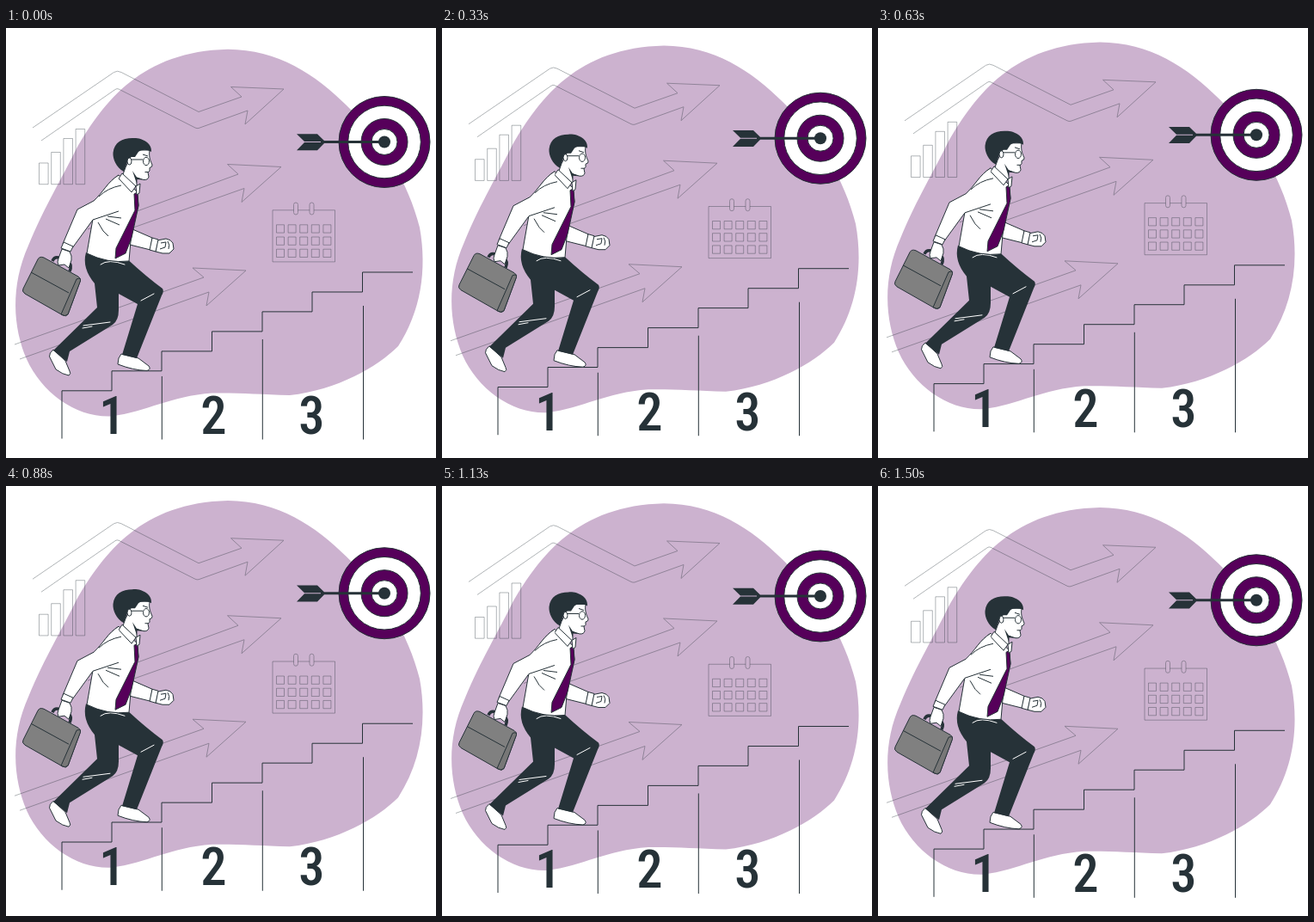
Animation, 500 px wide and 500 px high, one loop 1.54 s. Source, as an HTML page:

```html
<!DOCTYPE html>
<html lang="en">
<head>
<meta charset="utf-8">
<title>Steps to the goal</title>
<style>
  html, body { margin: 0; width: 100%; height: 100%; overflow: hidden; background: #fff; }
  svg { display: block; width: 100%; height: 100%; }
  .ink { fill: #263238; }
  .line { fill: none; stroke: #263238; stroke-width: 1; }
  .faint { fill: none; stroke: #263238; stroke-width: .9; opacity: .4; }
  .paper { fill: #fff; stroke: #263238; stroke-width: 1; stroke-linejoin: round; }
  .purple { fill: #56005a; stroke: #263238; stroke-width: 1; }
  .crease { fill: none; stroke: #fff; stroke-width: 1; stroke-linecap: round; }
  text { font: 500 60.5px "Roboto Condensed", Roboto, sans-serif; font-stretch: condensed; text-anchor: middle; }
</style>
</head>
<body>
<svg viewBox="0 0 500 500">
  <g id="scene">
    <path fill="#ccb2cf" d="M258 24.7C316 25 360 54 396 90C438 131 468 180 481 232C490 282 482 330 456 370C432 394 385 421 330 427C295 426 270 424 240 424.5C190 428 165 446 122 451.5C82 453 42 425 24 385C8 348 5 300 26 253C46 205 65 175 82 140C114 85 158 27 258 24.7Z"/>

    <g id="arrows" class="faint">
      <path d="M31 116L125.5 51.5Q129.5 49 134 51.5L224 97.5L274 80L261.5 68.5L323 71L278 112L281 96L224 116.5Q222 117 220 116L131 71Q129 70 127 71.5L41 131"/>
      <path d="M95 234L270 170L257.5 158.5L320 161.5L274 202.500L277 186.500L100 249"/>
      <path d="M10 368L230 290L217 279L279 282L233 323L236 307L16 385"/>
    </g>
    <path id="bars" class="faint"/>
    <path id="calendar" class="faint" d="M334.5 211.8H310V271.900H382.5V211.800H358M339.5 211.800H353"/>
    <g class="faint">
      <rect x="334.5" y="203" width="5" height="14" rx="2.5"/>
      <rect x="353" y="203" width="5" height="14" rx="2.5"/>
    </g>

    <g id="target">
      <circle class="purple" cx="440" cy="132.5" r="53"/>
      <circle class="paper" cx="440" cy="132.5" r="42.3"/>
      <circle class="purple" cx="440" cy="132.5" r="27"/>
      <circle class="paper" cx="440" cy="132.5" r="15"/>
      <circle class="ink" cx="440" cy="132.5" r="7"/>
      <path class="ink" d="M366 131H440V134H366ZM338 123.300H362L371 132H347ZM347 133H371L362 142.300H338Z"/>
    </g>

    <path class="line" d="M65 477.5V421.800H123V398.800H181V375.900H239.5V352.900H298V329.900H356V307H414.5V284H473M181.3 405V478.500M298.3 362V478.500M415.5 323V478.500"/>
    <g class="ink">
      <text x="123.500" y="472">1</text>
      <text x="241.500" y="472">2</text>
      <text x="355.500" y="472">3</text>
    </g>

    <g id="climber">
      <path class="paper" d="M147 234L170 244L168 258L144 252Z"/>
      <path class="paper" d="M176 247L186 245Q192 246 194 250L195 257L190 262H182L174 260Z"/>
      <path class="paper" d="M170 244L177 246L174 260L167 258Z"/>
      <path class="line" d="M180 250L186 249L185 255L179 257M188 248Q191 252 189 257"/>

      <path class="paper" d="M55 374Q50 378 50.5 382L58 397Q66 403 73 404Q76 402 74 399L69 387Z"/>
      <path class="paper" d="M134 379Q130 383 130 391Q148 398 164 398.5Q169 397 166 393L154 384Z"/>
      <path class="ink" d="M93 261Q118 274 143 270.500Q163 289 182 303Q184 306 181 311L152 384L135 380L153 321L131 309V328Q131 340 124 345L74 376L71 388L55 375L106 325L103 297Q88 279 93 261Z"/>
      <path class="crease" d="M157 317L172 309M90 346L121 342M89 349L100 347M110 275Q119 268 138 275"/>

      <path class="paper" d="M131 171C118 180 112 190 104 205L94 262Q118 274 143 271L146 236L154 206L152 190Z"/>
      <path class="purple" d="M149 193L153 191L154 207L146 244L139 262L127 268L128 256L150 212Z"/>
      <path class="paper" d="M149 142H167C166 148 167 153 170 159Q170.500 162 167 162.500V166L165 168L166 173Q165 177 160 176.500L152 174V185L135 173L139 162Z"/>
      <path class="ink" d="M147 166L152 173.500L159 176.500L152 176V181Z"/>
      <path class="ink" d="M137 167C128 162 124 152 124.5 145C126 133 135 128 147 128C157 127 170 133 169 144C164 141 158 141 154 144L150 150L145 150L141 156Z"/>
      <ellipse class="paper" cx="143.5" cy="155" rx="2.500" ry="4"/>
      <path class="line" d="M146 153H159M159 147L165 149M161.500 167.500H166"/>
      <ellipse class="line" cx="163" cy="155" rx="3.5" ry="4.700"/>
      <path class="paper" d="M135 169L151 184L146 191L131 175ZM151 184L156 181L155 192L152 194Z"/>

      <path fill="#808080" stroke="#263238" d="M37 269Q39 265 44 267L84 289Q88 291 86 295L72 333Q70 336 66 334L22 309Q18 306 20 303Z"/>
      <path fill="#777" stroke="#263238" d="M82 292Q87 290 86.5 294L72 333Q69 336 64 333Z"/>
      <path class="line" d="M29 284L73 308"/>
      <path fill="none" stroke="#263238" stroke-width="3.5" d="M54 271Q56 266 61 267L73 273Q77 276 74 283"/>
      <path class="paper" d="M65 257L74 260Q77 265 76 270L73 279L68 275L61 276Q59 272 61 268Z"/>
      <path class="paper" d="M131 171C118 179 113 191 102 201L83 211L66 251L77 256L101 223L131 213"/>
      <path class="line" d="M134 183Q118 186 108 196M118 219L134 221M116 222L132 229M107 226L113 236L119 242"/>
      <path class="paper" d="M67 249L78 254L75 260L64 256Z"/>
    </g>
  </g>
</svg>
<script>
  const PERIOD = 1540, LIFT = 10, LEAD = 30;
  const scene = document.getElementById('scene');
  const box = (x, y, w, h) => `M${x} ${y}h${w}v${h}h${-w}z`;

  document.getElementById('bars').setAttribute('d',
    [157, 144.5, 128.5, 117.5].map((y, i) => box(38.5 + i * 14.2, y, 10.6, 181.7 - y)).join(''));

  const calendar = document.getElementById('calendar');
  let cells = calendar.getAttribute('d');
  for (let i = 0; i < 15; i++)
    cells += box(314.5 + i % 5 * 13.6, 228.8 + Math.floor(i / 5) * 14.2, 9, 9.3);
  calendar.setAttribute('d', cells);

  // The whole scene floats up and down at constant speed.
  function draw() {
    const phase = (performance.now() + LEAD) / PERIOD % 1;
    const rise = LIFT * (1 - Math.abs(2 * phase - 1));
    scene.setAttribute('transform', `translate(0 ${(0.4 - rise).toFixed(3)})`);
    requestAnimationFrame(draw);
  }
  draw();
</script>
</body>
</html>
```
